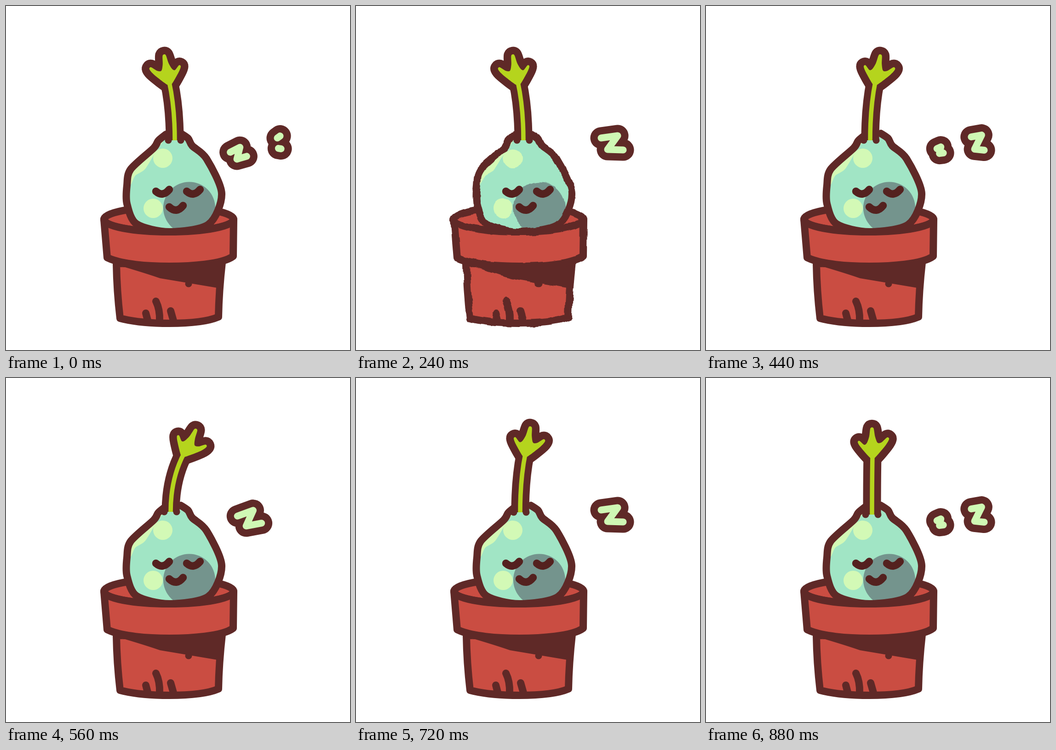
Animation, 748 px wide and 748 px high, one loop 0.92 s. Source, as an HTML page:

```html
<!DOCTYPE html>
<html lang="en">
<head>
<meta charset="utf-8">
<title>Sleepy sprout</title>
<style>
html, body { margin: 0; width: 100%; height: 100%; overflow: hidden; background: #fff; }
svg { display: block; width: 100vw; height: 100vh; }
path { stroke-linejoin: round; }
.line { fill: none; stroke: #5f2927; stroke-width: 16; stroke-linecap: round; }
.face { fill: none; stroke: #54211f; stroke-width: 16.5; stroke-linecap: round; }
.dark { fill: #5f2927; }
.red { fill: #ca4d42; }
.mint { fill: #a1e5c5; }
.pale { fill: #d3f9b6; }
.shade { fill: #74948d; }
</style>
</head>
<body>
<svg viewBox="0 0 748 748" xmlns="http://www.w3.org/2000/svg">
  <defs>
    <filter id="wobble" filterUnits="userSpaceOnUse" x="180" y="240" width="350" height="480" color-interpolation-filters="sRGB">
      <feTurbulence type="fractalNoise" baseFrequency=".04" numOctaves="1" seed="4" result="n"/>
      <feDisplacementMap in="SourceGraphic" in2="n" scale="8" xChannelSelector="R" yChannelSelector="G"/>
    </filter>
  </defs>
  <g id="plant"></g>
  <g id="stem"></g>
  <path class="face" d="M326 403Q341 416 355 399M393 403Q408 416 422 399M355 437Q371 452 385 434"/>
  <g id="zs"></g>
</svg>
<script>
const $ = id => document.getElementById(id);
const FRAME = 40, COUNT = 23, RAD = Math.PI / 180;
const INK = '#5f2927', LEAF = '#b5d41d', BREATH = '#cff8b4';

// Smooth path through a list of points
function curve(p, closed) {
  const n = p.length;
  const at = i => closed ? p[(i + n) % n] : p[Math.max(0, Math.min(n - 1, i))];
  let d = 'M' + p[0];
  for (let i = 0; i < (closed ? n : n - 1); i++) {
    const [a, b, c, e] = [at(i - 1), at(i), at(i + 1), at(i + 2)];
    const c1 = b.map((v, k) => v + (c[k] - a[k]) / 7);
    const c2 = c.map((v, k) => v - (e[k] - b[k]) / 7);
    d += `C${c1} ${c2} ${c}`;
  }
  return d + (closed ? 'Z' : '');
}
const path = (cls, d) => `<path class="${cls}" d="${d}"/>`;
const dot = (cls, x, y, r) => `<circle class="${cls}" cx="${x}" cy="${y}" r="${r}"/>`;
const stroke = (d, color, width, fill = 'none', cap = 'butt') =>
  `<path d="${d}" stroke="${color}" stroke-width="${width}" fill="${fill}" stroke-linecap="${cap}"/>`;

const body = curve([[348, 279], [331, 293], [321, 309], [271, 355], [263, 390], [263, 430],
  [284, 474], [355, 491], [440, 475], [469, 408], [436, 332], [405, 304], [396, 288], [380, 277]]);
const glow = curve([[346, 286], [322, 323], [302, 355], [281, 369], [271, 389], [264, 375],
  [295, 332], [332, 290]], true);
const mouth = 'M213 464A141 27 0 0 0 495 464A141 27 0 0 0 213 464Z';
const band = 'M213 464A141 27 0 0 0 495 464L494 544C470 562 400 566 355 566C310 566 250 562 220 547Z';
const tub = 'M240 560Q241 620 248 679Q290 690 355 690Q430 690 462 676Q463 620 470 558Z';
const shadow = 'M246 564Q310 583 335 592L460 613L472 555L355 560Z';

$('plant').innerHTML =
  path('red', mouth) + path('line', mouth) +
  path('mint', body) + path('pale', glow) +
  dot('pale', 341, 331, 21) + dot('pale', 320, 440, 21) +
  dot('shade', 398.5, 439, 56.5) + path('line', body) +
  path('red', tub) + path('dark', shadow) + dot('dark', 397, 604, 7.5) +
  path('line', tub) +
  path('line', 'M326 642Q335 660 334 685M304 668L308 683M358 663L364 684') +
  path('red', band) + path('line', band);

// Three tapered fingers fanned around the tilt; the longer outer one is on `side`
function crown(x, y, tilt, side) {
  const polar = (deg, r) => [x + r * Math.sin(deg * RAD), y - r * Math.cos(deg * RAD)];
  const pts = [[x - 4.5, y + 1]];
  for (const k of [-1, 0, 1]) {
    const a = tilt + 40 * k;
    const r = k === 0 ? 64 : k === side ? 54 : 46;
    pts.push(polar(a - 8, r * .72), polar(a - 3, r), polar(a + 3, r), polar(a + 8, r * .72));
    if (k < 1) pts.push(polar(a + 20, 34));
  }
  pts.push([x + 4.5, y + 1]);
  return curve(pts, true);
}
function stem({ root, y = 292, tip, top = 170, tilt, side }) {
  const stalk = `M${root} ${y}Q${root} 220 ${tip} ${top - 4}`;
  const leaf = crown(tip, top, tilt, side);
  return stroke(stalk, INK, 39) + stroke(leaf, INK, 33, INK) +
    dot('dark', root - 14, y, 7.5) + dot('dark', root + 13, y, 7.5) +
    stroke(stalk, LEAF, 9.5) + `<path d="${leaf}" fill="${LEAF}"/>`;
}
const left = stem({ root: 366, tip: 348, tilt: -26, side: -1 });
const halfLeft = stem({ root: 367, tip: 355, tilt: -10, side: -1 });
const middle = stem({ root: 361, y: 297, tip: 362, top: 173, tilt: -1, side: 1 });
const halfRight = stem({ root: 357, tip: 368, tilt: 10, side: 1 });
const right = stem({ root: 358, y: 291, tip: 386, tilt: 25, side: 1 });
const sway = [halfLeft, left, halfLeft, middle, halfRight, right, halfRight, middle];

// One letter, squeezed by sx, sy and turned; `join` M leaves out the diagonal
function zed(x, y, sx, sy, turn, join = 'L') {
  const s = Math.sin(turn * RAD), c = Math.cos(turn * RAD);
  const at = (u, v) => [x + u * sx * c - v * sy * s, y + u * sx * s + v * sy * c];
  const d = `M${at(-24, -11)}L${at(12, -16)}${join}${at(-10, 14)}L${at(24, 15)}`;
  return stroke(d, INK, 47, 'none', 'round') + stroke(d, BREATH, 15, 'none', 'round');
}
const snores = [
  zed(505, 321, .65, .75, -18) + zed(594, 297, .17, .9, 0, 'M'),
  zed(529, 306, 1, 1, -12),
  zed(557, 298, 1, 1, 0),
  zed(509, 314, .25, .45, -10) + zed(591, 297, .62, 1.05, 3)
];

function draw(f) {
  const rough = (f + (f > 2 && f < 14)) % 2 === 1;
  $('plant').setAttribute('filter', rough ? 'url(#wobble)' : 'none');
  $('stem').setAttribute('transform', `translate(${rough ? -3 : 0} 0)`);
  $('stem').innerHTML = sway[Math.floor((f + (f > 10)) / 3)];
  $('zs').innerHTML = snores[Math.floor((f + (f > 11)) / 3) % 4];
}
const start = performance.now();
let last = -1;
function tick() {
  const f = Math.floor((performance.now() - start) / FRAME) % COUNT;
  if (f !== last) draw(last = f);
  requestAnimationFrame(tick);
}
tick();
</script>
</body>
</html>
```
